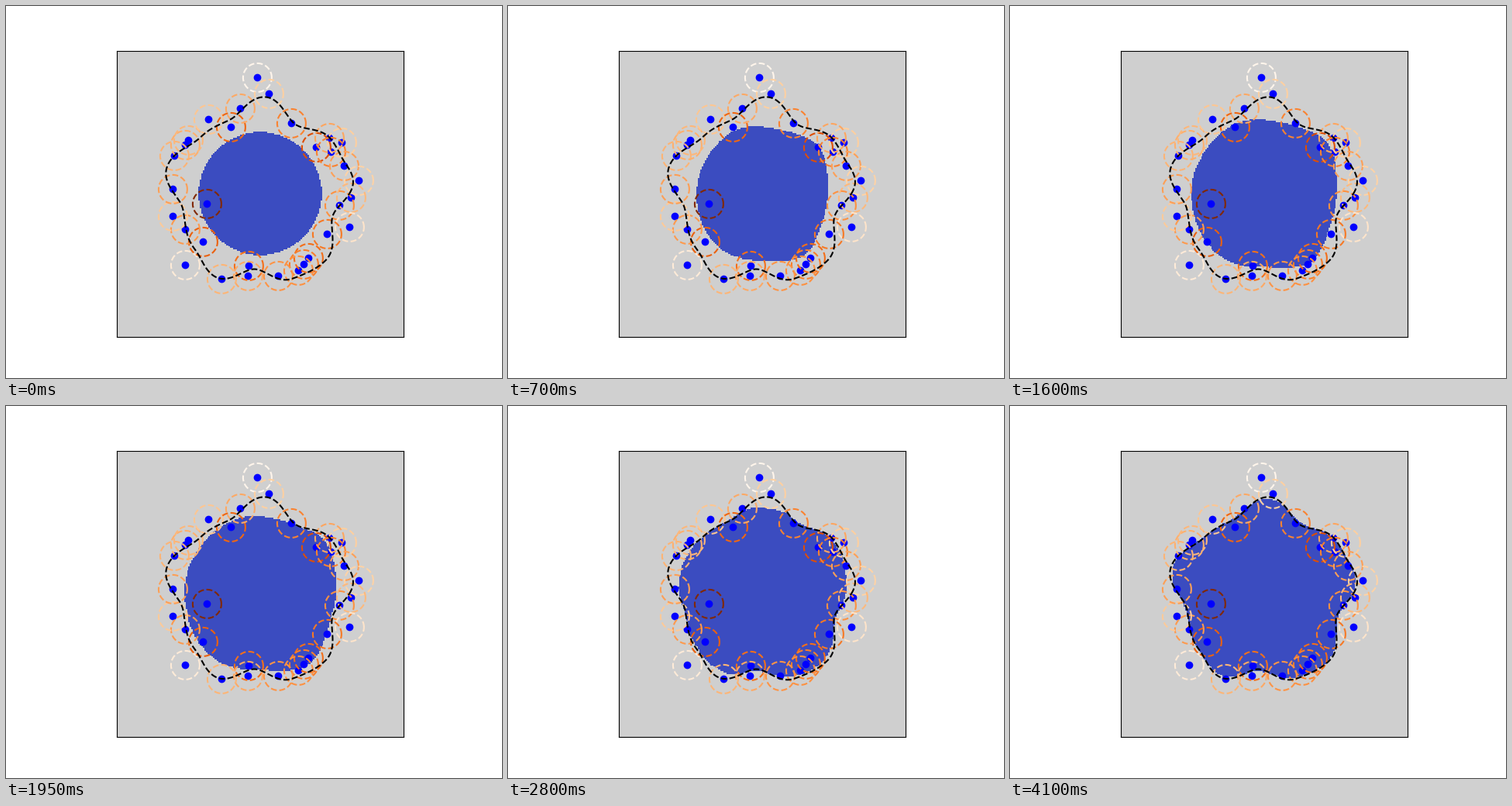
Write a matplotlib script that moves like this. It is 640x480 px and loops after 4150 ms.

```python
import numpy as np
import matplotlib.pyplot as plt
from matplotlib.animation import FuncAnimation
from matplotlib.colors import ListedColormap

FRAMES, INTERVAL = 83, 50
HALF = 184.8            # half the side of the plot, in pixels
CX, CY = 328, 242.4     # plot centre on the stage
START_RADIUS = 79
GRID = 200

deg = np.arange(0, 360, .5)

# Turning points of the outline: angle in degrees, radius
turns = [(9, 121.5), (25, 115), (38, 115.5), (62, 100), (87, 125.5),
         (113, 103), (136, 106), (165, 125.5), (191, 101.5), (220, 110.5),
         (242, 122), (266, 97), (290, 117), (315, 120.5), (343, 97.5)]

# Scattered samples on the stage, clockwise from the top
samples = [(324, 92), (339, 113), (368, 151), (400, 182), (417, 170),
           (433, 176), (419, 188), (436, 206), (455, 225), (445, 247),
           (430, 257), (443, 285), (414, 294), (390, 325), (384, 333),
           (377, 341), (351, 348), (313, 335), (312, 348), (278, 352),
           (231, 334), (254, 304), (231, 288), (215, 271), (259, 255),
           (215, 236), (217, 193), (231, 179), (235, 173), (261, 146),
           (290, 156), (302, 132)]


def eased_outline(angle):
    """Join the turning points with cosine easing."""
    radius = np.empty_like(angle)
    for (a, ra), (b, rb) in zip(turns, turns[1:] + turns[:1]):
        u = (angle - a) % 360 / ((b - a) % 360)
        part = u <= 1
        radius[part] = ra + (rb - ra) * (1 - np.cos(np.pi * u[part])) / 2
    return radius


def blur(radius, sigma):
    """Periodic Gaussian blur, sigma in degrees."""
    c = np.fft.rfft(radius)
    k = np.arange(len(c))
    return np.fft.irfft(c * np.exp(-(k * np.radians(sigma)) ** 2 / 2))


def bump(centre, height, width):
    d = (deg - centre + 180) % 360 - 180
    return height * np.exp(-(d / width) ** 2)


outline = blur(eased_outline(deg), 2)
limit = blur(outline, 6)
# Directions in which the front runs ahead
lead = bump(40, 11, 22) + bump(304, 13, 20) + bump(235, 5, 32) + bump(112, 4.5, 22)


def front(frame):
    """Accelerating front that settles softly against the outline."""
    free = (START_RADIUS + .35 * frame + .0033 * frame ** 2
            + lead * (1 - np.exp(-frame / 6)))
    soft = 4
    return -soft * np.logaddexp(-free / soft, -limit / soft)


def polar(x, y):
    return np.hypot(x, y), np.degrees(np.arctan2(y, x))


axis = (np.arange(GRID) + .5) / GRID * 2 * HALF - HALF
grid_r, grid_deg = polar(*np.meshgrid(axis, axis))


def region(frame):
    edge = np.interp(grid_deg, deg, front(frame), period=360)
    return (grid_r < edge).astype(int)


px, py = np.transpose(samples) + .4
px, py = px - CX, CY - py
r, angle = polar(px, py)
# Darker towards the centre, lighter outside the outline
shade = (.42 - .0155 * (r - 112)
         + .008 * (np.interp(angle, deg, outline, period=360) - 112))

fig = plt.figure(figsize=(6.4, 4.8), dpi=100)
ax = fig.add_axes([(CX - HALF) / 640, .11, 2 * HALF / 640, .77])
image = ax.imshow(region(0), origin="lower", vmin=0, vmax=1,
                  extent=(-HALF, HALF, -HALF, HALF), interpolation="nearest",
                  cmap=ListedColormap(["#cfcfcf", "#3b4cc0"]))
ax.scatter(px, py, color="blue")

turn = np.linspace(0, 2 * np.pi, 100)
ring = .1 * HALF
for x, y, value in zip(px, py, np.clip(shade, 0, 1)):
    ax.plot(x + ring * np.cos(turn), y + ring * np.sin(turn), "--",
            color=plt.cm.Oranges(value))

theta = np.radians(np.append(deg, 360))
closed = np.append(outline, outline[0])
ax.plot(closed * np.cos(theta), closed * np.sin(theta), "k--")
ax.set(xlim=(-HALF, HALF), ylim=(-HALF, HALF), xticks=[], yticks=[])


def update(frame):
    image.set_data(region(frame))
    return [image]


anim = FuncAnimation(fig, update, frames=FRAMES, interval=INTERVAL,
                     repeat=True, repeat_delay=0)
plt.show()
```
